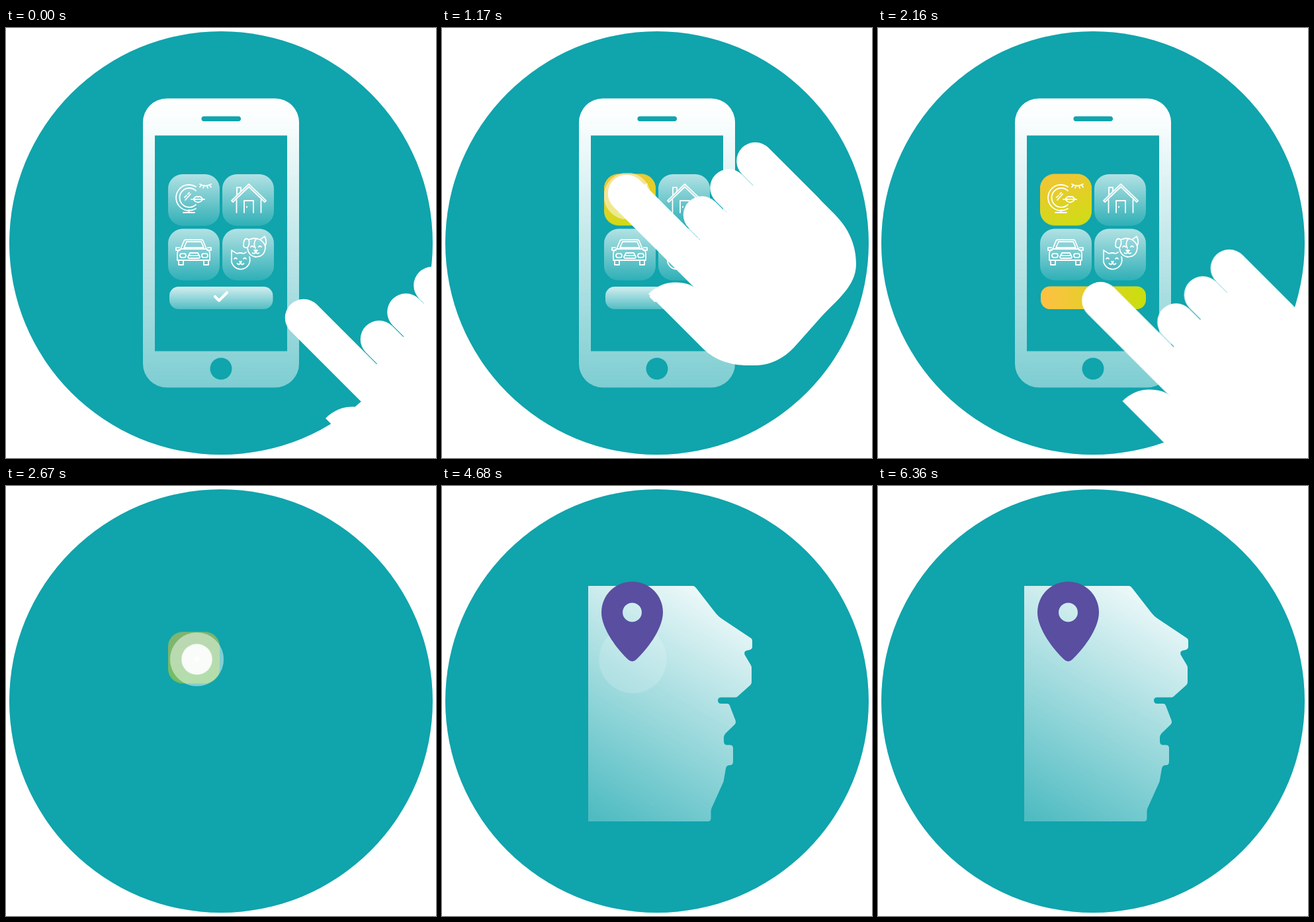
These frames come from a looping animation (650x650 px, 6660 ms). An HTML page:

```html
<!DOCTYPE html>
<html lang="en">
<head>
<meta charset="utf-8">
<title>Tap to locate</title>
<style>
  html, body { margin: 0; width: 100%; height: 100%; overflow: hidden; background: #fff; }
  svg { display: block; width: 100%; height: 100%; }

  /* one 6660 ms loop, advancing in 30 ms ticks */
  .anim, .phone, .hand, .tile-on, .button-on, .map, .pin, .halo, .dot {
    animation: 6660ms -1ms infinite linear both;
  }
  .phone { animation-name: leave; }
  .hand { animation-name: reach, leave; }
  .tile-on { animation-name: tile; }
  .button-on { animation-name: button; }
  .map { animation-name: map; }
  .pin { animation-name: pin; }
  .halo, .dot {
    transform-box: fill-box;
    transform-origin: center;
    animation-delay: calc(var(--at) * 1ms - 6661ms);
  }
  .halo { animation-name: halo; }
  .dot { animation-name: dot; }

  @keyframes reach {
    0% { transform: translate(450px, 438px); }
    2.703% { transform: translate(450px, 438px); animation-timing-function: steps(25); }
    13.964%, 18.018% { transform: translate(279px, 250px); }
    18.018% { animation-timing-function: steps(16); }
    25.225%, 100% { transform: translate(336.5px, 412px); }
  }
  @keyframes leave {
    0% { opacity: 1; }
    34.234% { opacity: 1; animation-timing-function: steps(10); }
    38.739%, 100% { opacity: 0; }
  }
  @keyframes tile {
    0% { opacity: 0; }
    13.964% { opacity: 0; animation-timing-function: steps(4); }
    15.766% { opacity: 1; }
    38.288% { opacity: 1; animation-timing-function: steps(8); }
    41.892%, 100% { opacity: 0; }
  }
  @keyframes button {
    0% { opacity: 0; }
    25.225% { opacity: 0; animation-timing-function: steps(4); }
    27.027%, 100% { opacity: 1; }
  }
  @keyframes map {
    0% { opacity: 0; }
    40.541% { opacity: 0; animation-timing-function: steps(11); }
    45.495%, 100% { opacity: 1; }
  }
  @keyframes pin {
    0% { opacity: 0; }
    40.541% { opacity: 0; animation-timing-function: steps(9); }
    44.595%, 100% { opacity: 1; }
  }
  @keyframes halo {
    0% { transform: scale(0); opacity: .55; animation-timing-function: steps(9); }
    4.054% { transform: scale(.698); opacity: .49; animation-timing-function: steps(4); }
    5.856% { transform: scale(.715); opacity: .47; animation-timing-function: steps(8); }
    9.459% { transform: scale(.886); opacity: .2; animation-timing-function: steps(9); }
    13.514%, 100% { transform: scale(1); opacity: 0; }
  }
  @keyframes dot {
    0% { transform: scale(0); opacity: 1; animation-timing-function: steps(8); }
    3.604% { transform: scale(.95); opacity: .95; animation-timing-function: steps(5); }
    5.856% { transform: scale(1); opacity: .9; animation-timing-function: steps(8); }
    9.459%, 100% { transform: scale(1.1); opacity: 0; }
  }
</style>
</head>
<body>
<svg viewBox="0 0 650 650">
  <defs>
    <linearGradient id="case" x2="0" y2="1">
      <stop stop-color="#fff"/>
      <stop offset=".08" stop-color="#fff" stop-opacity=".98"/>
      <stop offset="1" stop-color="#fff" stop-opacity=".46"/>
    </linearGradient>
    <linearGradient id="glass" x2="0" y2="1">
      <stop stop-color="#fff" stop-opacity=".68"/>
      <stop offset="1" stop-color="#fff" stop-opacity=".13"/>
    </linearGradient>
    <linearGradient id="bar" x2="0" y2="1">
      <stop stop-color="#fff" stop-opacity=".82"/>
      <stop offset="1" stop-color="#fff" stop-opacity=".28"/>
    </linearGradient>
    <linearGradient id="sunDown" x1=".3" x2=".6" y2="1">
      <stop stop-color="#f2c534"/>
      <stop offset="1" stop-color="#d0dc16"/>
    </linearGradient>
    <linearGradient id="sunAcross">
      <stop stop-color="#ffc044"/>
      <stop offset="1" stop-color="#c8df0c"/>
    </linearGradient>
    <linearGradient id="land" gradientUnits="userSpaceOnUse" x1="250" y1="510" x2="450" y2="162">
      <stop stop-color="#fff" stop-opacity=".27"/>
      <stop offset="1" stop-color="#fff" stop-opacity=".97"/>
    </linearGradient>
    <rect id="tile" width="78" height="78" rx="22"/>
  </defs>

  <circle cx="325" cy="325" r="320" fill="#10a4ac"/>

  <g class="phone">
    <rect x="207" y="106.5" width="236" height="437" rx="36" fill="url(#case)"/>
    <g fill="#10a4ac">
      <rect x="225" y="162.5" width="200" height="326"/>
      <rect x="295.5" y="133.5" width="59.5" height="7.5" rx="3.75"/>
      <circle cx="325" cy="515" r="16.5"/>
    </g>
    <g fill="url(#glass)">
      <use href="#tile" x="245" y="221"/>
      <use href="#tile" x="327" y="221"/>
      <use href="#tile" x="245" y="303.5"/>
      <use href="#tile" x="327" y="303.5"/>
    </g>
    <rect x="247" y="391" width="156.5" height="34" rx="14" fill="url(#bar)"/>
    <rect class="button-on" x="246" y="390.5" width="159" height="34.5" rx="14" fill="url(#sunAcross)"/>
  </g>

  <use class="tile-on" href="#tile" x="245" y="220.5" fill="url(#sunDown)"/>

  <g class="phone" fill="none" stroke="#fff" stroke-width="1.8" stroke-linecap="round" stroke-linejoin="round">
    <path d="M316 406l6 6 12-12" stroke-width="4.2"/>
    <!-- mirror, lashes, lips -->
    <path d="M287 240a19.5 19.5 0 1 0 0 33M287 246a14.5 14.5 0 1 0 0 21M276.500 275v4M268 279h17"/>
    <path d="M270 256l3-3m2-2l2-2M271 260l8-9"/>
    <path d="M293 236q8 5 17 0M295 238l-2 2.500M299 239.500l-1 2.500M304 239.500l1 2.500M308 238l2 2.500"/>
    <path d="M280 259h20M283 259q4-6 7.500-3.500 3.500-2.500 7 3.500-7 9-14.500 0z"/>
    <!-- house -->
    <path d="M341 261l26-25 26 25-2 2-24-23-24 23zM349 252v-11h6v6M348.500 260v19M385.500 260v19M360 279v-18h14v18M364 270v1"/>
    <!-- car -->
    <path d="M264 334l5-12q1-2 3-2h23q2 0 3 2l5 12M269 332l4-9h22l4 9zM264 334h39q5 2 5 7v10h-49v-10q0-5 5-7z"/>
    <path d="M261 351v7h7v-6M299 352v6h7v-7M263 336h-6v-4h5M305 332h5v4h-6M278 340h12l3 6q0 2-2 2h-14q-2 0-2-2zM278 344h12"/>
    <rect x="263" y="341" width="9" height="6" rx="3"/>
    <rect x="296" y="341" width="9" height="6" rx="3"/>
    <!-- cat and dog -->
    <path d="M341 336l8 5q5-2 10 0l4-2M341 336v12a14 14 0 1 0 27-2"/>
    <path d="M345 349q2-3 4 0M359 349q2-3 4 0M353 353h3l-1.500 2zM354.500 355q-2 4-5 1M354.500 355q2 4 5 1"/>
    <path d="M367 320q-7-5-8 7-1 6 6 5 4-5 2-12zM367 320q9-4 17 0l7-5q4 8 1 14M365 332q1 12 12 14 14 0 15-14 0-7-8-12"/>
    <path d="M378 319q-5 7-1 14M370 331q2-3 4 0M382 331q2-3 4 0M375 336h5l-2.500 3zM377.500 339q-2 3-5 1M377.500 339q2 3 5 1"/>
  </g>

  <path class="map" fill="url(#land)" d="M221 151H379Q382 151 384 154L412 190Q417 197 425 202L467 230Q469 231 469 234V243Q469 247 464 248
    Q455 249 457.500 255L467 271Q468 273 468 275V296Q468 299 466 301L447 318Q445.500 319.500 443 319.500H422Q417 319.500 417 324.200
    Q417 329 422 329H431Q434 329 435 332L443.500 354Q445 358 442 361L428.500 374Q426 377 426 380V386Q426 391.500 431 391.500H435
    Q440 391.500 440 396.500V417Q440 422 435 422Q430 422 429 427L425.500 447L407.500 487Q406.500 489 406.500 492V502Q406.500 507 402 507H221Z"/>

  <g id="ripples" fill="#fff"></g>

  <path class="pin" fill="#594ea0" fill-rule="evenodd" d="M287.500 144.500A46.500 46.500 0 0 1 334 191C334 217 308 249 294 262
    Q287.500 268.500 281 262C267 249 241 217 241 191A46.500 46.500 0 0 1 287.500 144.500ZM287.500 176.500a14.500 14.500 0 1 0 .01 0Z"/>

  <!-- origin: centre of the index fingertip -->
  <g class="hand">
    <path fill="none" stroke="#fff" stroke-width="56.500" stroke-linecap="round"
      d="M0 0L120 120M114 32.500L190 108.500M154.500 -8.500L230 67M194.500 -49L270 26.500"/>
    <path fill="#fff" d="M33 152C45 140 59 134.500 74 134.500C88 134.500 98 138 105 144L90 120L111 69L191 -11.500L234 -49L314 31
      C336 53 347 78 347 107C347 140 318 161 293 188L253 233C237 250 216 260 194 260H183C158 260 133 252 116 235Z"/>
  </g>
</svg>
<script>
  const layer = document.getElementById('ripples');
  const addCircle = (name, at, x, y, r) => {
    const c = document.createElementNS(layer.namespaceURI, 'circle');
    c.setAttribute('class', name);
    c.setAttribute('cx', x);
    c.setAttribute('cy', y);
    c.setAttribute('r', r);
    c.style.setProperty('--at', at);
    layer.append(c);
  };
  const ripple = (at, x, y) => {
    addCircle('halo', at, x, y, 57);
    addCircle('dot', at, x, y, 23.5);
  };

  // each pulse is a pair of ripples; the very first follows the fingertip
  [930, 2310, 3690, 5130].forEach((at, i) => {
    ripple(at, i ? 288.5 : 280, i ? 262 : 254);
    ripple(at + 330, 288.5, 262);
  });
</script>
</body>
</html>
```
